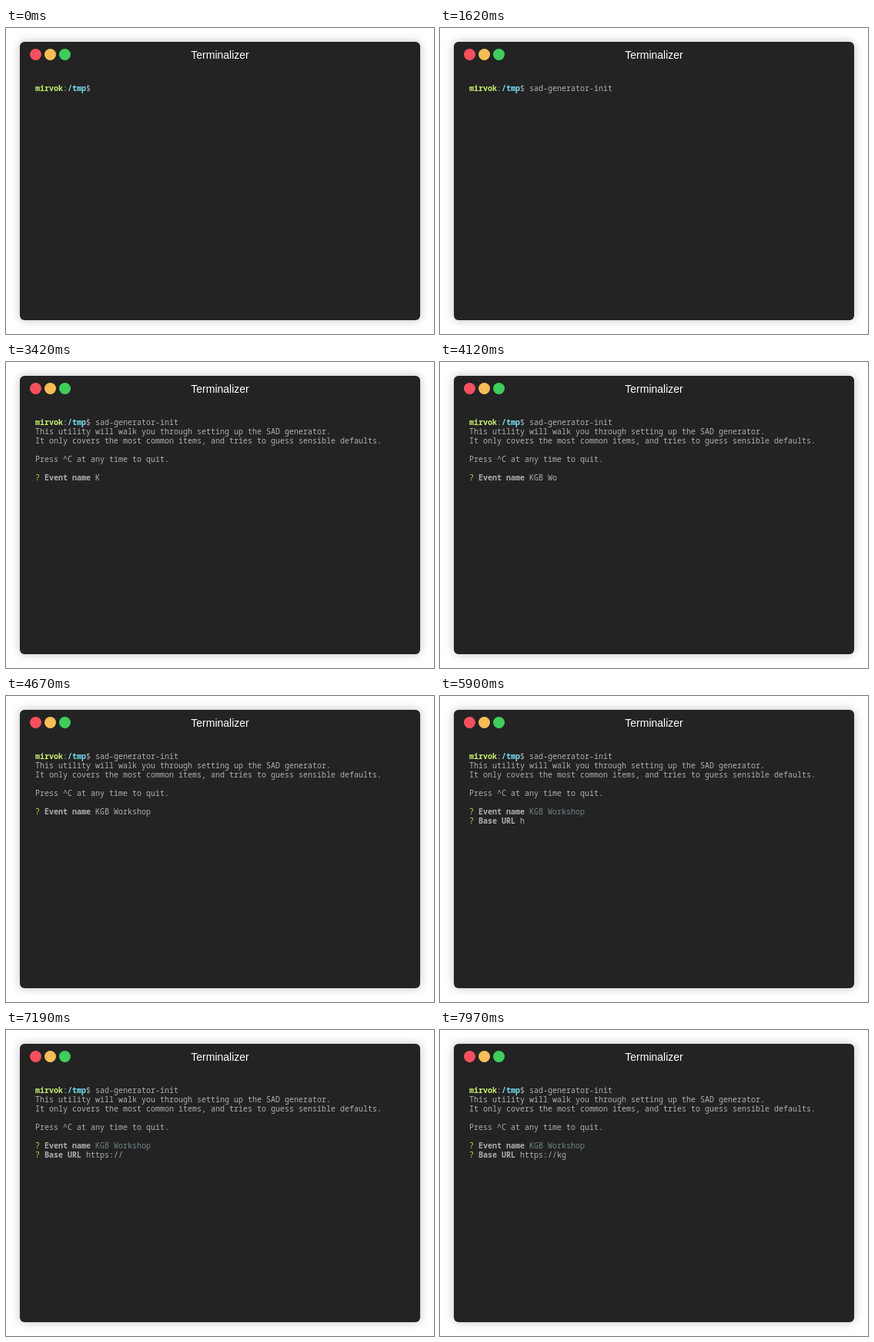
An HTML page that plays this animation: 556 by 398 pixels, repeating every 8 s.

```html
<!DOCTYPE html>
<html lang="en">
<head>
<meta charset="utf-8">
<title>Terminal</title>
<style>
html, body { margin: 0; width: 100%; height: 100%; overflow: hidden; background: #fff; }
.window {
  position: absolute; left: 18px; top: 18px; width: 520px; height: 362px;
  border-radius: 6px; background: #232323; box-shadow: 0 0 12px rgba(0, 0, 0, .25);
}
.dot { position: absolute; top: 9px; width: 15px; height: 15px; border-radius: 50%; }
.title {
  position: absolute; left: 0; right: 0; top: 0; text-align: center; color: #fff;
  font: 14px/34px "Liberation Sans", Arial, sans-serif;
}
pre {
  position: absolute; left: 20px; top: 54px; margin: 0; color: #afafaf;
  font: 10px/12px "Noto Sans Mono", "DejaVu Sans Mono", monospace;
  font-variant-ligatures: none;
}
b { font-weight: 700; }
.user { color: #c8ed71; }
.path { color: #75dff2; }
.mark { color: #b3e33b; }
.done { color: #708387; }
.hint { color: #696969; }
</style>
</head>
<body>
<div class="window">
  <div class="dot" style="left:13px;background:#f6505f"></div>
  <div class="dot" style="left:32px;background:#f7be57"></div>
  <div class="dot" style="left:51px;background:#3fcd5c"></div>
  <div class="title">Terminalizer</div>
  <pre id="screen"></pre>
</div>
<script>
const LOOP = 8000;
const screen = document.getElementById('screen');

const PROMPT = '<b class="user">mirvok</b>:<b class="path">/tmp</b>$ ';
const INTRO = [
  'This utility will walk you through setting up the SAD generator.',
  'It only covers the most common items, and tries to guess sensible defaults.',
  '',
  'Press ^C at any time to quit.',
  ''
];

// [time, visible text] pairs
const command = [
  [1170, 's'], [1270, 'sa'], [1370, 'sad'], [1530, 'sad-'], [1620, 'sad-generator-init']
];
const name = typed('KGB Workshop',
  [3420, 3500, 3620, 3900, 3990, 4087, 4184, 4281, 4379, 4476, 4573, 4670]);
const url = typed('https://kg',
  [5900, 5980, 6120, 6390, 6530, 6850, 7070, 7190, 7820, 7970]);

function typed(text, times) {
  return times.map((t, i) => [t, text.slice(0, i + 1)]);
}

function textAt(steps, t) {
  let text = '';
  for (const [start, value] of steps) if (t >= start) text = value;
  return text;
}

function question(label, hint, steps, t, end) {
  const answer = textAt(steps, t);
  const value = !answer ? `<span class="hint">(${hint})</span>`
    : t >= end ? `<span class="done">${answer}</span>` : answer;
  return `<span class="mark">?</span> <b>${label}</b> ${value}`;
}

function render(t) {
  const lines = [PROMPT + textAt(command, t)];
  if (t >= 2450) lines.push(...INTRO);
  if (t >= 2550) lines.push(question('Event name', 'Sample Conference', name, t, 5000));
  if (t >= 5100) lines.push(question('Base URL', 'https://example.com', url, t, LOOP));
  return lines.join('\n');
}

let shown = '';
const start = performance.now();
function tick() {
  const html = render((performance.now() - start) % LOOP);
  if (html !== shown) screen.innerHTML = shown = html;
  requestAnimationFrame(tick);
}
tick();
</script>
</body>
</html>
```
